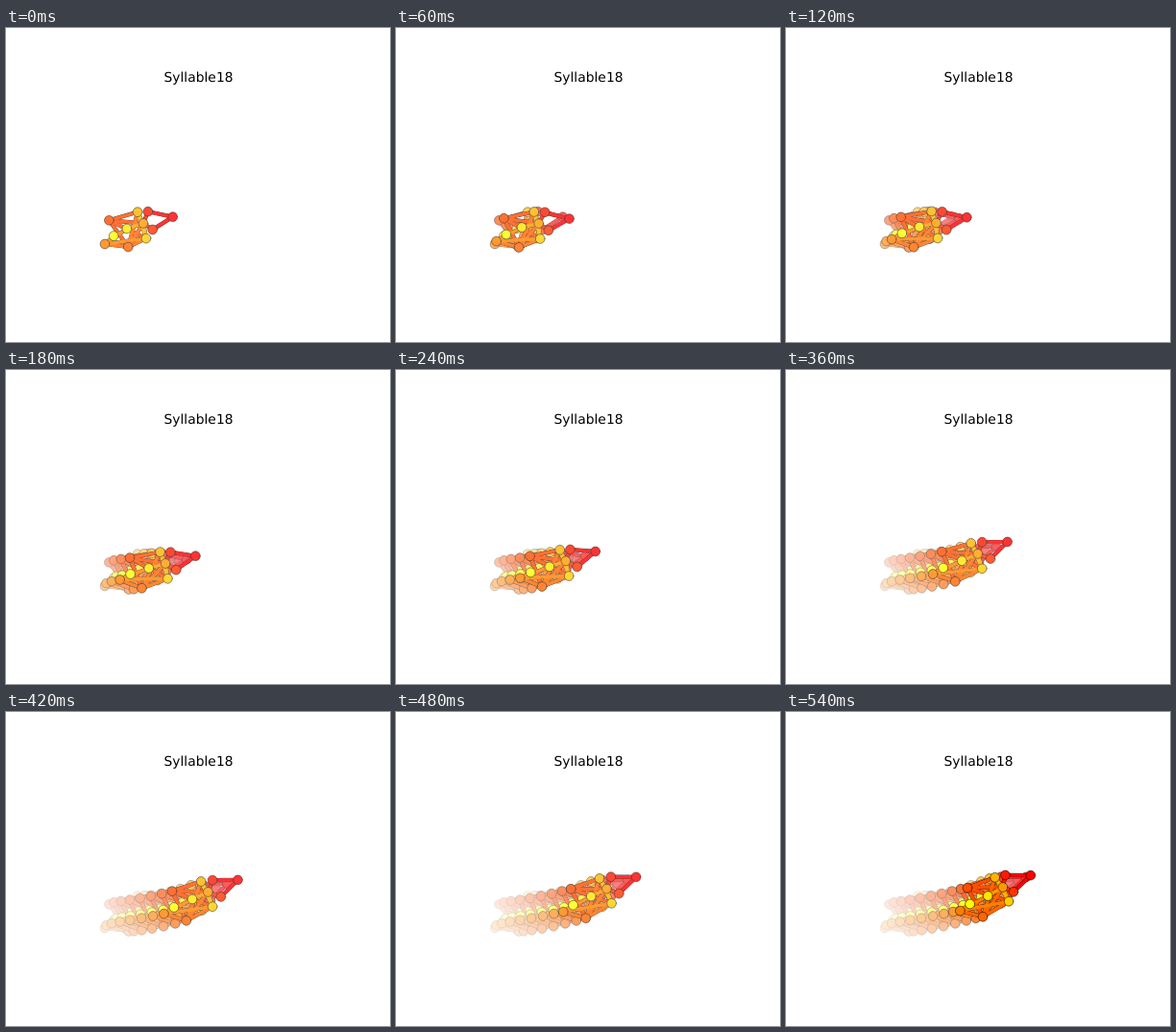
These frames come from a looping animation (400x327 px, 0.6 s). An HTML page with a canvas:

```html
<!DOCTYPE html>
<html lang="en">
<head>
<meta charset="utf-8">
<title>Syllable18</title>
<style>
  html, body { margin: 0; width: 100%; height: 100%; overflow: hidden; background: #fff; }
  canvas { display: block; width: 400px; height: 327px; }
</style>
</head>
<body>
<canvas id="stage" width="400" height="327"></canvas>
<script>
const ctx = document.getElementById('stage').getContext('2d');
const STEPS = 10, STEP_MS = 60, FADE = 0.2;
const LINE = 4.17, RADIUS = 4.9;

// The body is three rigid parts. Each has keypoints around its centre
// and a track of [x, y, turn in degrees] at the key steps.
const keySteps = [0, 2, 5, 7, 9];
const parts = [
  { // head
    points: { A: [15.6, -2.6], B: [-10.2, -8.1], C: [-5.4, 10.7] },
    track: [[158.1, 199.3, 0], [172.7, 199.6, 1], [204.2, 189.4, -11], [226.8, 180.8, -12.5], [240.1, 175.8, -11.5]]
  },
  { // hind
    points: { D: [-5.1, -17.2], E: [14.8, 10.5], F: [-9.5, 7.5], K: [-0.3, -0.9] },
    track: [[112.5, 217.5, 0], [121, 214.8, 12.5], [152, 209.6, 13], [175.1, 204.4, 10], [191.8, 200.9, 7.5]]
  },
  { // trunk
    points: { G: [5, -2.4], H: [-0.9, -14.1], I: [8, 13.3], J: [-12.1, 3.2] },
    track: [[138, 205.8, 0], [151.3, 205, 5], [183.5, 198.2, -4], [205.7, 190.4, -6.5], [221.5, 185.9, -12]]
  }
];
const names = [...'ABCDEFGHIJK'];
const edges = 'AB AC BG CG DE DG DH DI EF EG EH EI FI FJ FK GH GI GJ HI'.split(' ');

// Smooth curve through the track's key values
function along(track, step) {
  const weights = keySteps.map(a =>
    keySteps.reduce((w, b) => a === b ? w : w * (step - b) / (a - b), 1));
  return [0, 1, 2].map(d => track.reduce((sum, key, i) => sum + weights[i] * key[d], 0));
}

function poseAt(step) {
  const pose = {};
  for (const { points, track } of parts) {
    const [cx, cy, turn] = along(track, step);
    const cos = Math.cos(turn * Math.PI / 180), sin = Math.sin(turn * Math.PI / 180);
    for (const [name, [x, y]] of Object.entries(points)) {
      pose[name] = [cx + x * cos - y * sin, cy + x * sin + y * cos];
    }
  }
  return pose;
}

const color = name => `rgb(255,${Math.round(names.indexOf(name) * 25.5)},0)`;

function drawEdges(pose, width, stroke) {
  ctx.lineWidth = width;
  ctx.lineCap = 'square';
  for (const [from, to] of edges) {
    ctx.strokeStyle = stroke(from);
    ctx.beginPath();
    ctx.moveTo(...pose[from]);
    ctx.lineTo(...pose[to]);
    ctx.stroke();
  }
}

function drawPose(pose) {
  drawEdges(pose, LINE, () => '#000');
  drawEdges(pose, LINE * 0.9, color);
  ctx.lineWidth = 0.55;
  ctx.strokeStyle = '#000';
  for (const name of names) {
    ctx.fillStyle = color(name);
    ctx.beginPath();
    ctx.arc(...pose[name], RADIUS, 0, 2 * Math.PI);
    ctx.fill();
    ctx.stroke();
  }
}

function cover(alpha) {
  ctx.fillStyle = `rgba(255,255,255,${alpha})`;
  ctx.fillRect(0, 0, 400, 327);
}

function draw(step) {
  cover(1);
  for (let i = 0; i <= step; i++) {
    drawPose(poseAt(i));
    // A white veil fades every pose but the very last
    if (i < STEPS - 1) cover(FADE);
  }
  ctx.fillStyle = '#000';
  ctx.font = '13.89px "DejaVu Sans", sans-serif';
  ctx.textRendering = 'geometricPrecision';
  ctx.textAlign = 'center';
  ctx.fillText('Syllable18', 200.5, 56);
}

const start = performance.now();
let shown = -1;
function tick() {
  const step = Math.floor((performance.now() - start) / STEP_MS) % STEPS;
  if (step !== shown) draw(shown = step);
  requestAnimationFrame(tick);
}
tick();
</script>
</body>
</html>
```
